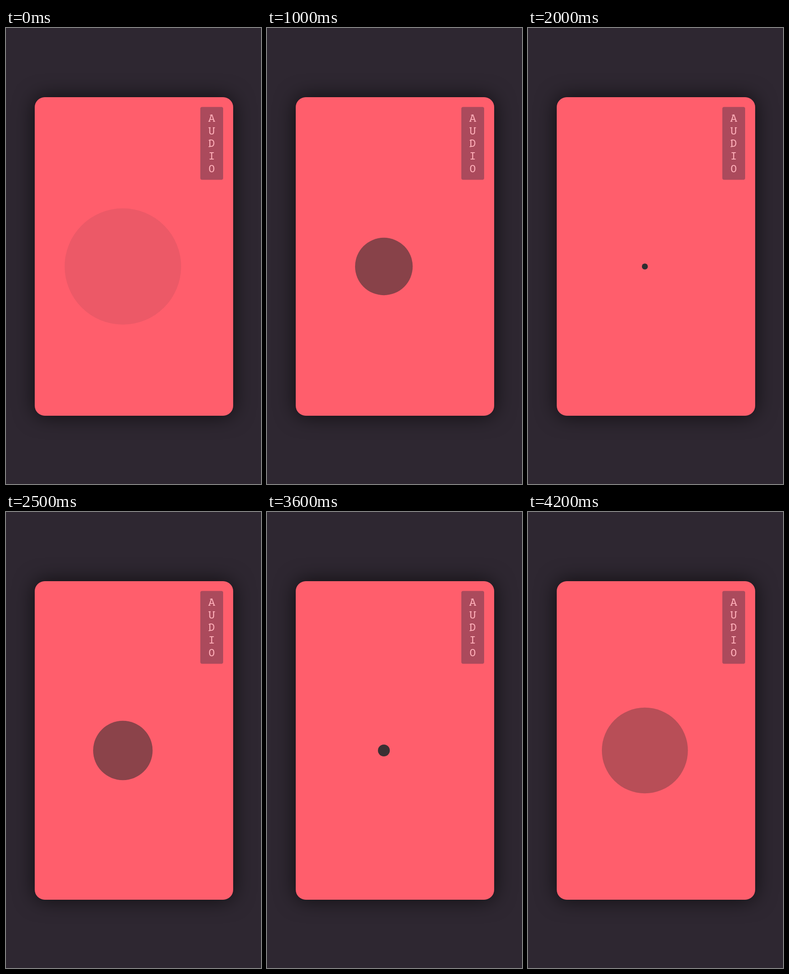
An HTML page for the animation above (4300 ms loop, 559 px wide and 1002 px high).

```html
<!DOCTYPE html>
<html lang="en">
<head>
<meta charset="utf-8">
<title>Audio pulse</title>
<style>
  html, body { margin: 0; width: 100%; height: 100%; overflow: hidden; background: #2e2731; }
  .card {
    position: absolute; left: 63px; top: 151.5px; width: 435px; height: 700px;
    border-radius: 22px; background: #ff5e6c; box-shadow: 0 0 45px rgba(0, 0, 0, .68);
  }
  svg { position: absolute; left: 0; top: 0; display: block; }
  text { font: 23px "Liberation Mono", monospace; text-anchor: middle; fill: #ffb0ba; }
</style>
</head>
<body>
<div class="card"></div>
<svg width="559" height="1002" viewBox="0 0 559 1002">
  <circle id="pulse" cx="256.2" cy="524" r="0" fill="#262b2d"/>
  <rect x="426" y="173.5" width="50" height="160" rx="4" fill="#ab4a5c"/>
  <g id="label" fill="none" stroke="#ffb0ba" stroke-width="1.4"></g>
</svg>
<script>
  const LOOP = 4300, STEP = 100, PULSE = 1500;
  const starts = [-1239, 281, 1768, 3276];
  const MAX_R = 136, FADE_R = 139.5;
  const pulse = document.getElementById('pulse');

  // Slab serifs, relative to each letter's baseline centre.
  const slabs = {
    A: 'M-7.4-.7H-2.8M2.8-.7H7.4M-4-14.5H.6',
    U: 'M-7.2-14.5H-2.4M2.4-14.5H7.2',
    D: 'M-7-14.5H-3M-7-.7H-3'
  };
  document.getElementById('label').innerHTML = [...'AUDIO'].map((ch, i) =>
    `<g transform="translate(451 ${206 + i * 27.7})">
      <text stroke="none">${ch}</text><path d="${slabs[ch] || ''}"/></g>`).join('');

  // cubic-bezier(.42, 0, .58, 1)
  function easeInOut(x) {
    let lo = 0, hi = 1;
    for (let i = 0; i < 24; i++) {
      const s = (lo + hi) / 2, q = 1 - s;
      if (1.26 * q * q * s + 1.74 * q * s * s + s * s * s < x) lo = s; else hi = s;
    }
    return lo * lo * (3 - 2 * lo);
  }

  function draw(ms) {
    const t = Math.floor((ms % LOOP) / STEP) * STEP;
    const start = starts.filter(s => s <= t).pop();
    const x = (t - start) / PULSE;
    const r = x < .86 ? MAX_R * easeInOut(x) : 0;
    pulse.setAttribute('r', r.toFixed(2));
    pulse.setAttribute('opacity', (1 - r / FADE_R).toFixed(3));
  }

  let begin;
  function tick(now) {
    begin ??= now;
    draw(Math.max(0, now - begin));
    requestAnimationFrame(tick);
  }
  draw(0);
  requestAnimationFrame(tick);
</script>
</body>
</html>
```
